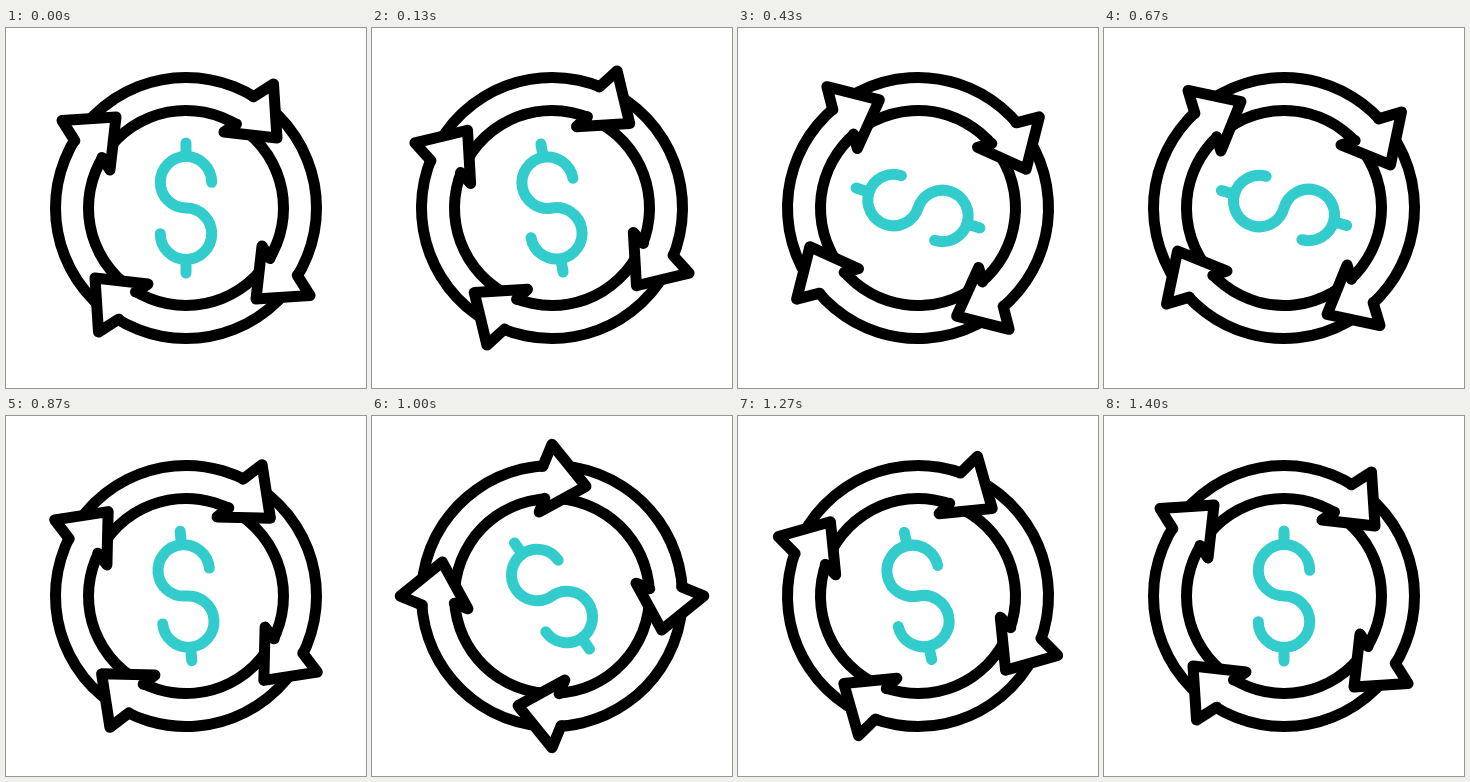
Recreate the animation shown at these times as an HTML page. Size 360 by 360 pixels, loop 2 s.

```html
<!DOCTYPE html>
<html lang="en">
<head>
<meta charset="utf-8">
<title>Money cycle</title>
<style>
  html, body { margin: 0; width: 100%; height: 100%; overflow: hidden; background: #fff; }
  svg { display: block; width: 100vw; height: 100vh; }
  g { stroke-width: 11; stroke-linecap: round; stroke-linejoin: round; }
</style>
</head>
<body>
<svg viewBox="-180 -180 360 360">
  <defs>
    <path id="head" d="M67.3-111.2 L87.5-124 L91-70 L38-76 L50.5-84"/>
  </defs>
  <g id="icon" fill="none" stroke="#000">
    <circle r="130.5"/>
    <circle r="97.5"/>
    <g fill="#fff">
      <use href="#head"/>
      <use href="#head" transform="rotate(90)"/>
      <use href="#head" transform="rotate(180)"/>
      <use href="#head" transform="rotate(270)"/>
    </g>
    <path stroke="#33cccc" d="M25.7-25.7 A25.7 25.7 0 1 0 0 0 A25.7 25.7 0 1 1 -25.7 25.7 M0-65 V-51.4 M0 65 V51.4"/>
  </g>
</svg>
<script>
  const LOOP = 2000, FPS = 30;
  const BACK = 17, END = 42;       // ticks: end of wind-up, end of spin
  const WINDUP = -80, TURN = 360;  // degrees
  const icon = document.getElementById('icon');

  // Timing curve with handles (a, 0) and (b, 1)
  function ease(x, a, b) {
    if (x <= 0) return 0;
    if (x >= 1) return 1;
    let lo = 0, hi = 1, t = 0.5;
    for (let i = 0; i < 30; i++) {
      t = (lo + hi) / 2;
      const u = 1 - t;
      if (3 * t * u * u * a + 3 * t * t * u * b + t * t * t < x) lo = t;
      else hi = t;
    }
    return t * t * (3 - 2 * t);
  }

  function angle(tick) {
    if (tick < BACK) return WINDUP * ease(tick / BACK, 0.41, 0.54);
    return WINDUP + (TURN - WINDUP) * ease((tick - BACK) / (END - BACK), 0.664, 0.379);
  }

  function draw(ms) {
    const tick = Math.floor((ms % LOOP + 3.4) * FPS / 1000);
    icon.setAttribute('transform', `rotate(${angle(tick).toFixed(3)})`);
  }

  const start = performance.now();
  function loop() {
    draw(performance.now() - start);
    requestAnimationFrame(loop);
  }
  loop();
</script>
</body>
</html>
```
